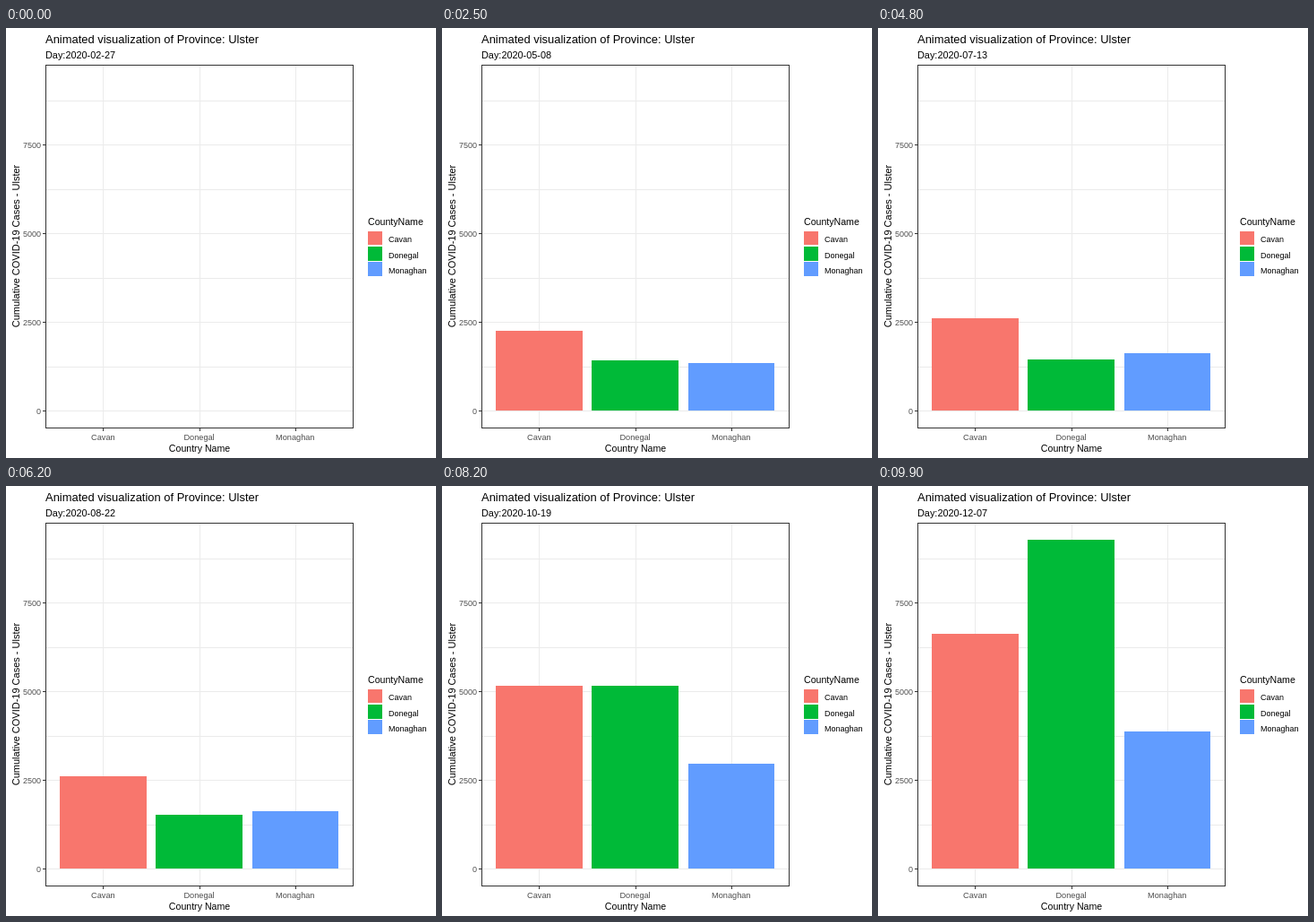
Animation, 480 px wide and 480 px high, one loop 10 s. Source, as an HTML page with a canvas:

```html
<!DOCTYPE html>
<html lang="en">
<head>
<meta charset="utf-8">
<title>Cumulative cases by county</title>
<style>
  html, body { margin: 0; width: 100%; height: 100%; overflow: hidden; background: #fff; }
  canvas { display: block; width: 480px; height: 480px; }
</style>
</head>
<body>
<canvas id="stage" width="480" height="480"></canvas>
<script>
const ctx = document.getElementById('stage').getContext('2d');

const FRAMES = 100, STEP = 100, SPAN = 284;
const START = Date.UTC(2020, 1, 27), DAY_MS = 86400000;
const ZERO = 427.6, BASE = 427, PX_PER_CASE = 0.03968;
const BAR_HALF = 48.2;

// Each county grows in S-shaped waves of infection
const counties = [
  { name: 'Cavan', color: '#F8766D', waves: [
    { size: 2600, mid: 54.9, spread: 8.9 },
    { size: 4020, mid: 231.2, spread: 7.2 }
  ] },
  { name: 'Donegal', color: '#00BA38', waves: [
    { size: 1450, mid: 46.3, spread: 6.2 },
    { size: 5000, mid: 227, spread: 11.2 },
    { size: 3600, mid: 266.1, spread: 13.5 }
  ] },
  { name: 'Monaghan', color: '#619CFF', waves: [
    { size: 1250, mid: 49.8, spread: 5.4 },
    { size: 380, mid: 80, spread: 10 },
    { size: 1800, mid: 226.5, spread: 8.5 },
    { size: 520, mid: 270, spread: 8 }
  ] }
];
counties.forEach((c, i) => { c.x = 108.35 + i * 107.2; });

function casesOn(day, waves) {
  return waves.reduce((sum, w) => sum + w.size / (1 + Math.exp((w.mid - day) / w.spread)), 0);
}

function rect(x, y, w, h, color) {
  ctx.fillStyle = color;
  ctx.fillRect(x, y, w, h);
}

// Fills between two edges snapped to whole pixels
function box(left, top, right, bottom, color) {
  const x = Math.round(left), y = Math.round(top);
  rect(x, y, Math.round(right) - x, Math.max(0, Math.round(bottom) - y), color);
}

function text(str, x, y, size, color = '#000', align = 'left') {
  ctx.font = size + 'px "Liberation Sans", Arial, sans-serif';
  ctx.fillStyle = color;
  ctx.textAlign = align;
  ctx.fillText(str, x, y);
}

function drawGrid() {
  for (let i = 0; i < 8; i++) rect(44, Math.round(BASE - i * 49.5), 343, 1, '#EBEBEB');
  for (const c of counties) rect(Math.round(c.x), 41, 1, 405, '#EBEBEB');
}

function drawBars(day) {
  for (const c of counties) {
    const top = ZERO - casesOn(day, c.waves) * PX_PER_CASE;
    box(c.x - BAR_HALF, top, c.x + BAR_HALF, BASE, c.color);
  }
}

function drawAxes() {
  ctx.strokeStyle = '#333';
  ctx.lineWidth = 1;
  ctx.strokeRect(44.5, 41.5, 343, 405);
  for (let i = 0; i < 4; i++) {
    const y = BASE - i * 99;
    rect(41, y, 3, 1, '#333');
    text(String(i * 2500), 39, y + 4, 9, '#4D4D4D', 'right');
  }
  for (const c of counties) {
    rect(Math.round(c.x), 447, 1, 3, '#333');
    text(c.name, c.x, 460, 9.2, '#4D4D4D', 'center');
  }
  text('Country Name', 216, 473, 10.6, '#000', 'center');
  ctx.save();
  ctx.translate(15, 243.5);
  ctx.rotate(-Math.PI / 2);
  text('Cumulative COVID-19 Cases - Ulster', 0, 0, 11, '#000', 'center');
  ctx.restore();
}

function drawLegend() {
  text('CountyName', 404, 220, 10.6);
  counties.forEach((c, i) => {
    const shift = i * 17.28;
    box(404, 226.6 + shift, 420, 242.3 + shift, c.color);
    text(c.name, 427, Math.round(239.3 + shift), 9);
  });
}

function draw(now) {
  const frame = Math.floor(now / STEP) % FRAMES;
  const day = frame * SPAN / (FRAMES - 1);
  const date = new Date(START + Math.floor(day) * DAY_MS).toISOString().slice(0, 10);

  rect(0, 0, 480, 480, '#fff');
  drawGrid();
  drawBars(day);
  drawAxes();
  drawLegend();
  text('Animated visualization of Province: Ulster', 44, 17, 12.95);
  text('Day:' + date, 44, 34, 10.9);
}

const begin = performance.now();
function tick() {
  draw(performance.now() - begin);
  requestAnimationFrame(tick);
}
tick();
</script>
</body>
</html>
```
